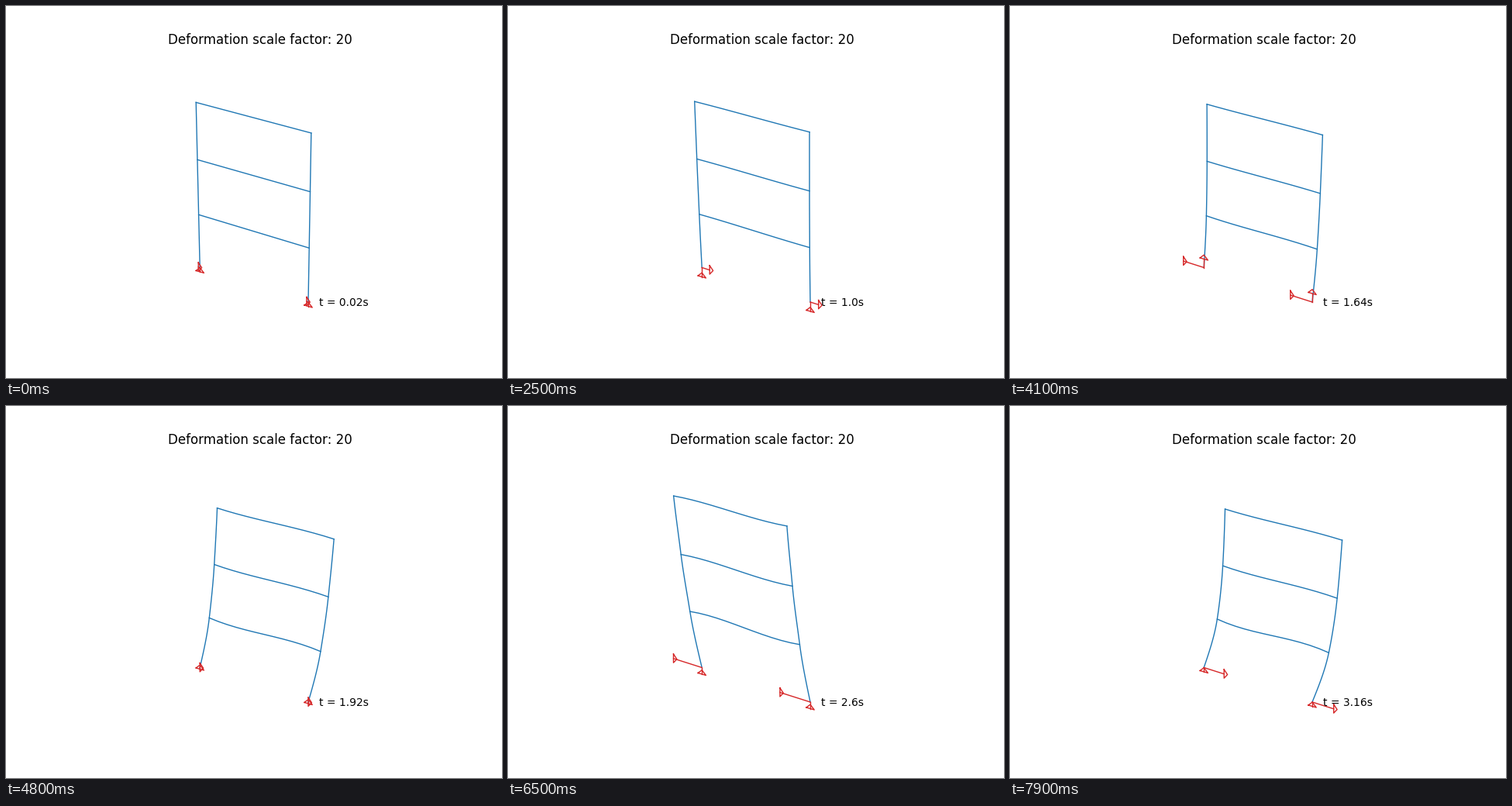
A matplotlib script for the animation above (8 s loop, 640x480 px).

```python
import numpy as np
import matplotlib.pyplot as plt
from matplotlib.animation import FuncAnimation

W, H, DPI = 640, 480, 100
FRAMES, INTERVAL = 80, 100
BAY = 2.0  # bay width in storey heights

# Supports in pixels, with the perspective scale of their arrows
BASES = [((250.2, 337.5), 1.0), ((390, 382), 1.065)]
CORNERS = [((0, 0), BASES[0][0]), ((1, 0), BASES[1][0]),
           ((0, 3), (245.2, 124.4)), ((1, 3), (393.8, 163.9))]

# Turning points (step, value): roof sway in bays, ground motion in pixels
ROOF = [(0, 0), (14, .027), (22, -.058), (25, -.031), (29.5, -.1),
        (52, .213), (62.5, -.308), (74.3, .5), (84.2, -.1)]
GROUND_X = [(0, -2), (14, -3), (25, 10), (30, -14), (34, 17), (38, 26),
            (42, -44), (48, 0), (51, 80), (55, -57), (59, 42), (65, -36.7),
            (69, 4), (76, -14), (79, 26)]
GROUND_Z = [(0, -5.5), (14, 8.7), (25, -12), (27, -41), (34, 24),
            (48, -2), (65, -8.5), (79, -5.5)]


def homography(pairs):
    rows, rhs = [], []
    for (u, z), (x, y) in pairs:
        rows += [[u, z, 1, 0, 0, 0, -u * x, -z * x],
                 [0, 0, 0, u, z, 1, -u * y, -z * y]]
        rhs += [x, y]
    return np.append(np.linalg.solve(rows, rhs), 1).reshape(3, 3)


PROJ = homography(CORNERS)


def project(u, z):
    x, y, w = PROJ @ np.array([u, z, np.ones_like(u)])
    return x / w, y / w


def linear(keys, t):
    return np.interp(t, *np.array(keys, float).T)


def swing(keys, t):
    """Half a cosine wave between neighbouring turning points."""
    x, y = np.array(keys, float).T
    phase = np.interp(t, x, np.arange(len(x)))
    k = min(int(phase), len(x) - 2)
    return y[k] + (y[k + 1] - y[k]) * (1 - np.cos(np.pi * (phase - k))) / 2


def hermite(s, a, b, da, db):
    return (a * (1 + 2 * s) * (1 - s) ** 2 + b * s ** 2 * (3 - 2 * s)
            + da * s * (1 - s) ** 2 + db * s ** 2 * (s - 1))


def frame_shape(i):
    """Projected polylines of two columns and three beams."""
    roof = swing(ROOF, i)
    second = -.017 * min(1, i / 55) ** 2 * np.cos(2 * np.pi * (i - 72) / 13.6)
    sway = [0, .53 * roof + second, .82 * roof + .7 * second, roof]
    c = np.diff(sway)
    slope = [0, .42 * (c[0] + c[1]), .42 * (c[1] + c[2]), .8 * c[2]]
    slope[0] = 1.5 * c[0] - .5 * slope[1]  # pinned base
    s = np.linspace(0, 1, 13)
    shift = np.concatenate([hermite(s, sway[k], sway[k + 1],
                                    slope[k], slope[k + 1])
                            for k in range(3)])
    height = np.concatenate([s, s + 1, s + 2])
    lines = [project(side + shift, height) for side in (0, 1)]
    for k in (1, 2, 3):
        bend = hermite(s, 0, 0, 1, 1) * slope[k] * BAY * BAY
        lines.append(project(sway[k] + s, k - bend))
    return lines


def arrow_shapes(i):
    """Shaft and fixed-direction head for each ground motion component."""
    gx, gz = linear(GROUND_X, i), linear(GROUND_Z, i)
    shapes = []
    for (x, y), scale in BASES:
        ex, ey = x + gx * scale, y + .318 * gx * scale
        shapes.append(([x, ex], [y, ey]))
        shapes.append(([ex, ex + 4.4, ex, ex],
                       [ey - 5.8, ey + .8, ey + 5.4, ey - 5.8]))
        top = y - gz
        shapes.append(([x, x], [y, top]))
        shapes.append(([x - 5, x, x + 5.2, x - 5],
                       [top - 1.5, top - 5.3, top + 1.5, top - 1.5]))
    return shapes


plt.rcParams["font.family"] = "DejaVu Sans"
fig = plt.figure(figsize=(W / DPI, H / DPI), dpi=DPI, facecolor="white")
ax = fig.add_axes([0, 0, 1, 1])
ax.set(xlim=(0, W), ylim=(H, 0))
ax.axis("off")
ax.text(328, 49.3, "Deformation scale factor: 20", fontsize=12,
        ha="center", va="baseline")
clock = ax.text(404, 387, "", fontsize=10, va="baseline", zorder=5)
members = [ax.plot([], [], color="tab:blue", lw=1)[0] for _ in range(5)]
arrows = [ax.plot([], [], color="tab:red", lw=1, zorder=3)[0]
          for _ in range(8)]


def update(i):
    for line, pts in zip(members, frame_shape(i)):
        line.set_data(*pts)
    for line, pts in zip(arrows, arrow_shapes(i)):
        line.set_data(*pts)
    clock.set_text(f"t = {round(max(.02, .04 * i), 2)}s")
    return members + arrows + [clock]


anim = FuncAnimation(fig, update, frames=FRAMES, interval=INTERVAL,
                     repeat=True, repeat_delay=0)
plt.show()
```
